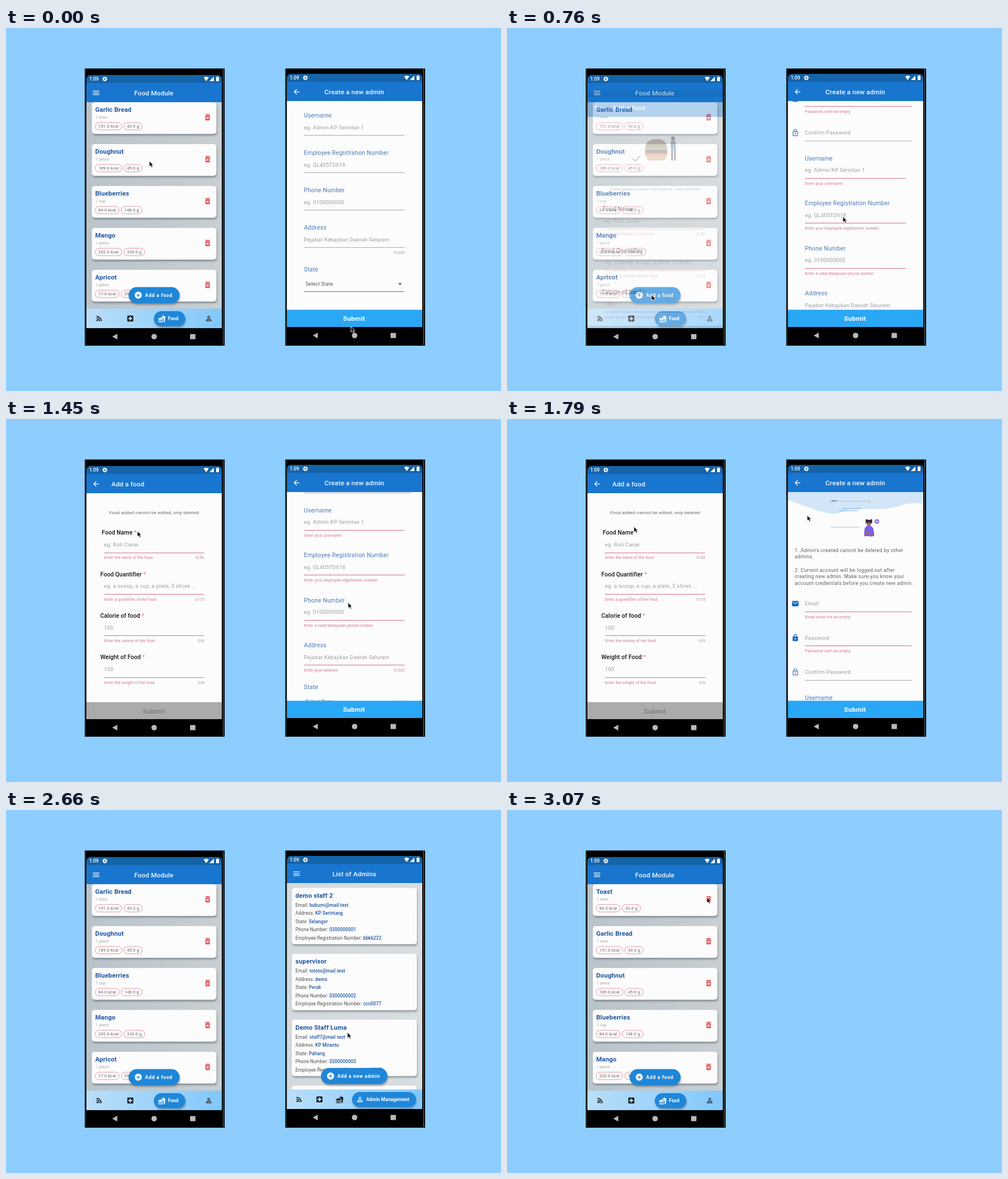
An HTML page that plays this animation: 874x641 px, repeating every 3.48 s.

```html
<!DOCTYPE html>
<html lang="en">
<head>
<meta charset="utf-8">
<title>Two phone screens</title>
<style>
html, body { margin: 0; width: 100%; height: 100%; overflow: hidden; background: #8ecdff; }
svg { display: block; width: 874px; height: 641px; }
text { font-family: Roboto, Arial, sans-serif; white-space: pre; }
.raised { filter: drop-shadow(1px 3px 1.5px rgba(60, 75, 85, .42)); }
</style>
</head>
<body>
<svg id="stage" viewBox="0 0 874 641" xmlns="http://www.w3.org/2000/svg"></svg>
<script>
const LOOP = 3480, STEP = 3070 / 53;
const BLUE = '#1976cf', INK = '#1f559f', FIELD = '#4c78b5', RED = '#d3728a', COUNT = '#b38a95', HINT = '#9c9c9c', PAPER = '#fcfcfc';

const ICONS = {
  menu: 'M3 18h18v-2H3zm0-5h18v-2H3zm0-7v2h18V6z',
  back: 'M20 11H7.83l5.59-5.59L12 4l-8 8 8 8 1.41-1.41L7.83 13H20z',
  feed: 'M6.18 15.64a2.18 2.18 0 1 0 0 4.36 2.18 2.18 0 0 0 0-4.36zM4 4.44v2.83c7.03 0 12.73 5.7 12.73 12.73h2.83C19.56 11.41 12.59 4.44 4 4.44zm0 5.66v2.83c3.9 0 7.07 3.17 7.07 7.07h2.83c0-5.47-4.43-9.9-9.9-9.9z',
  clinic: 'M19 3H5a2 2 0 0 0-2 2v14a2 2 0 0 0 2 2h14a2 2 0 0 0 2-2V5a2 2 0 0 0-2-2zm-1 11h-4v4h-4v-4H6v-4h4V6h4v4h4z',
  person: 'M12 5.9a2.1 2.1 0 1 1 0 4.2 2.1 2.1 0 0 1 0-4.2m0 9c2.97 0 6.1 1.46 6.1 2.1v1.1H5.9V17c0-.64 3.13-2.1 6.1-2.1M12 4a4 4 0 1 0 0 8 4 4 0 0 0 0-8zm0 9c-2.67 0-8 1.34-8 4v3h16v-3c0-2.66-5.33-4-8-4z',
  food: 'M18.06 23h1.66c.84 0 1.53-.64 1.63-1.46L23 5.05h-5V1h-1.97v4.05h-4.97l.3 2.34c4 1 6.7 4 6.7 7.55zM1 22v-1h15v1l-1 1H2zm15-7c0-8-15-8-15 0zM1 17h15v2H1z',
  add: 'M12 2a10 10 0 1 0 0 20 10 10 0 0 0 0-20zm5 11h-4v4h-2v-4H7v-2h4V7h2v4h4z',
  bin: 'M6 19a2 2 0 0 0 2 2h8a2 2 0 0 0 2-2V7H6zm2.46-7.12l1.41-1.41L12 12.59l2.12-2.12 1.41 1.41L13.41 14l2.12 2.12-1.41 1.41L12 15.41l-2.12 2.12-1.41-1.41L10.59 14zM15.5 4l-1-1h-5l-1 1H5v2h14V4z',
  mail: 'M20 4H4a2 2 0 0 0-2 2v12a2 2 0 0 0 2 2h16a2 2 0 0 0 2-2V6a2 2 0 0 0-2-2zm0 4l-8 5-8-5V6l8 5 8-5z',
  lock: 'M18 8h-1V6A5 5 0 0 0 7 6v2H6a2 2 0 0 0-2 2v10a2 2 0 0 0 2 2h12a2 2 0 0 0 2-2V10a2 2 0 0 0-2-2zM9 8V6a3 3 0 0 1 6 0v2zm3 5a2 2 0 1 1 0 4 2 2 0 0 1 0-4z',
  lockOutline: 'M18 8h-1V6A5 5 0 0 0 7 6v2H6a2 2 0 0 0-2 2v10a2 2 0 0 0 2 2h12a2 2 0 0 0 2-2V10a2 2 0 0 0-2-2zM9 8V6a3 3 0 0 1 6 0v2zm9 12H6V10h12zm-6-7a2 2 0 1 1 0 4 2 2 0 0 1 0-4z'
};

// Drawing helpers; text and icons are placed by their vertical centre.
const rect = (x, y, w, h, fill, r = 0, more = '') =>
  `<rect x="${x}" y="${y}" width="${w}" height="${h}" rx="${r}" fill="${fill}" ${more}/>`;
const text = (x, y, s, size, fill, { w = 400, ls = 0, a = 'start' } = {}) =>
  `<text x="${x}" y="${y + size * .355}" font-size="${size}" font-weight="${w}" letter-spacing="${ls}" text-anchor="${a}" fill="${fill}">${s}</text>`;
const shape = (d, fill, more = '') => `<path d="${d}" fill="${fill}" ${more}/>`;
const icon = (name, x, y, fill, size = 14) =>
  shape(ICONS[name], fill, `fill-rule="evenodd" transform="translate(${x - size / 2} ${y - size / 2}) scale(${size / 24})"`);
const rule = (x1, x2, y, color) => `<path d="M${x1} ${Math.floor(y) + .5}H${x2}" stroke="${color}"/>`;
const group = (id, body, more = '') => `<g id="${id}" ${more}>${body}</g>`;
const title = (x, y, s, a = 'middle') => text(x, y, s, 11.7, '#f2f8ff', { w: 500, ls: .1, a });
const heading = (x, y, s) => text(x, y, s, 11.3, INK, { w: 700, ls: .15 });
const label = (x, y, s) => text(x, y, s, 10.46, FIELD, { ls: .21 });
const hint = (x, y, s) => text(x, y, s, 9.3, HINT, { ls: .28 });
const small = (x, y, s, fill = RED, a = 'start') => text(x, y, s, 7, fill, { ls: .12, a });

const pill = (x, y, w, h, name, s, size, ls) => `<g class="raised">${rect(x, y, w, h, '#1f86d8', h / 2)}</g>`
  + icon(name, x + (h > 28 ? 17 : 14), y + h / 2, '#fff', h > 28 ? 15 : 14)
  + text(x + (h > 28 ? 29 : 25), y + h / 2, s, size, '#fff', { w: 700, ls });

// A page header in left-phone coordinates.
const header = (name, s, x = 261, a = 'middle') =>
  rect(142, 83, 239, 14, '#1563a8') + rect(142, 97, 239, 34, BLUE) + icon(name, 159, 114.5, '#fff', 15) + title(x, 114.5, s, a);
const onRight = body => `<g transform="translate(354 -2)">${body}</g>`;

const phone = (content, dx, dy) => {
  const gear = `<circle cx="174.500" cy="90" r="2.400" fill="none" stroke="#fff" stroke-width="1.800"/><circle cx="174.500" cy="90" r="3.800" fill="none" stroke="#fff" stroke-width="1.200" stroke-dasharray="1.500 1.480"/>`;
  return rect(139 + dx, 71.5, 247, 489.5, '#000')
    + `<path d="M${383.5 + dx} 72V560" stroke="#6d7780"/><path d="M${140.5 + dx} 72V560" stroke="#454d54"/>`
    + `<g clip-path="url(#screen${dx ? 'Right' : 'Left'})">${content}`
    + `<g transform="translate(${dx} ${dy})">${rect(142, 83, 239, 14, '#1563a8')}`
    + text(147, 90.5, '1:09', 8.4, '#fff', { w: 500 }) + gear
    + shape('M349 87.500Q353.500 84.500 358 87.500L353.500 94zM367 86V94H359z', '#fff') + rect(371, 86.5, 5, 7.5, '#fff', .8) + rect(372.5, 85.5, 2, 2, '#fff')
    + '</g></g>'
    + `<g transform="translate(${dx} ${dy})">` + shape('M196.500 540V550L187.500 545z', '#b9b9b9')
    + '<circle cx="261.500" cy="545" r="4.800" fill="#b9b9b9"/>' + rect(325, 540.5, 9.5, 9, '#b9b9b9', .8) + '</g>';
};

// Left phone
const FOODS = [
  ['Toast', '1 slice', '86.0 kcal', '33.0 g'],
  ['Garlic Bread', '1 slice', '151.0 kcal', '43.0 g'],
  ['Doughnut', '1 piece', '189.0 kcal', '45.0 g'],
  ['Blueberries', '1 cup', '84.0 kcal', '148.0 g'],
  ['Mango', '1 piece', '202.0 kcal', '336.0 g'],
  ['Apricot', '1 piece', '17.0 kcal', '35.0 g']
];
const chip = (x, y, w, s) => rect(x, y - 6.5, w, 13, 'none', 6.5, 'stroke="#e0889b" stroke-width=".9"')
  + text(x + w / 2, y, s, 7.5, '#666', { ls: .15, a: 'middle' });
const foodCard = ([name, unit, energy, weight], i) => {
  const y = 131 + i * 74, w = energy.length * 4.7;
  return `<g class="raised">${rect(151.5, y, 220, 56, PAPER, 5)}</g>` + heading(157.5, y + 12.5, name)
    + small(158, y + 27, unit, '#a2a2a2') + chip(157.5, y + 42.5, w, energy)
    + chip(161 + w, y + 42.5, weight.length * 4.5 + 5.5, weight) + icon('bin', 356, y + 26.5, '#e04f50', 15);
};
const foodPage = rect(142, 131, 239, 399, 'url(#wall)')
  + `<g clip-path="url(#foodArea)">${group('foods', FOODS.map(foodCard).join(''))}</g>`
  + pill(216.5, 457.5, 90, 28.5, 'add', 'Add a food', 8.5, .7)
  + rect(142, 495.5, 239, 34.5, 'url(#bar)')
  + icon('feed', 164.5, 513, '#111') + icon('clinic', 219.5, 513, '#111') + icon('person', 358, 513, '#222')
  + pill(261, 500, 55.5, 26.5, 'food', 'Food', 8.2, 0) + header('menu', 'Food Module');

const FOOD_FIELDS = [
  ['Food Name', 'eg. Roti Canai', 'Enter the name of the food', '0/50'],
  ['Food Quantifier', 'eg. a scoop, a cup, a plate, 3 slices ...', 'Enter a quantifier of the food', '0/15'],
  ['Calorie of food', '100', 'Enter the calorie of the food', '0/6'],
  ['Weight of Food', '100', 'Enter the weight of the food', '0/6']
];
const foodField = ([name, eg, error, count], i) => {
  const y = 293.5 + i * 73.4;
  return text(i ? 166.5 : 169, y, `${name} <tspan fill="#e5737f" font-weight="400">*</tspan>`, 10.46, '#161616', { w: 500, ls: .05 })
    + hint(173, y + 21, eg) + rule(173, 350, y + 35.5, RED) + small(173, y + 44.5, error) + small(350, y + 44.5, count, COUNT, 'end');
};
const burger = shape('M244 211Q246 196 264 196T282 211z', '#80604a') + rect(243, 211, 41, 4, '#6f9a56', 2)
  + rect(244, 215, 39, 6, '#4a3530', 2) + rect(243, 221, 41, 3, '#d9564c') + shape('M245 224H282Q282 234 273 234H254Q245 234 245 224z', '#c79a5a')
  + '<circle cx="293" cy="195" r="3.500" fill="#33272e"/>' + rect(289, 199, 9, 15, '#36598c', 3) + rect(290, 213, 3, 21, '#232b42') + rect(295, 213, 3, 21, '#232b42')
  + '<path d="M222 231l5 4 8-9" fill="none" stroke="#555" stroke-width="1.500"/>';
const foodForm = rect(142, 131, 239, 399, PAPER)
  + `<g clip-path="url(#foodFormArea)">${group('foodScroll', `<g transform="translate(0 -26)">${burger}</g>`
    + text(261.5, 258, 'Food added cannot be edited, only deleted', 8.1, '#666', { ls: .17, a: 'middle' })
    + FOOD_FIELDS.map(foodField).join(''))}</g>`
  + rect(142, 500, 239, 30, '#ababab') + text(261.5, 515.5, 'Submit', 11.7, '#6c6c6c', { ls: .4, a: 'middle' })
  + header('back', 'Add a food', 186, 'start');

// Right phone
const ADMINS = [
  ['demo staff 2', 'bubumi@mail.test', 'KP Serintang', 'Selangor', '0300000001', 'bbkk222'],
  ['supervisor', 'tototo@mail.test', 'demo', 'Perak', '0300000002', 'ccc0077'],
  ['Demo Staff Luma', 'staff7@mail.test', 'KP Mirantu', 'Pahang', '0300000003', 'ddd0055'],
  ['']
];
const KEYS = ['Email', 'Address', 'State', 'Phone Number', 'Employee Registration Number'];
const adminCard = ([name, ...values], i) => {
  const y = 137.5 + i * 116.4;
  return `<g class="raised">${rect(504.5, y, 221, 99.5, PAPER, 5)}</g>` + heading(511, y + 13.5, name)
    + values.map((v, n) => text(511, y + 30.5 + n * 14.5,
      `${KEYS[n]}: <tspan fill="${INK}" font-weight="500">${v}</tspan>`, 8.14, '#4d4d4d', { ls: .13 })).join('');
};
const adminPage = rect(496, 129, 239, 399, 'url(#paleWall)') + ADMINS.map(adminCard).join('')
  + pill(556, 455.5, 117.5, 28.5, 'add', 'Add a new admin', 8.5, .65)
  + rect(496, 493.5, 239, 34.5, 'url(#bar)')
  + icon('feed', 517.5, 511, '#111') + icon('clinic', 553.5, 511, '#111') + icon('food', 589, 511, '#111')
  + pill(611, 498, 113, 26.5, 'person', 'Admin Management', 8.2, .1) + onRight(header('menu', 'List of Admins'));

const NOTES = ["1. Admin's created cannot be deleted by other", 'admins.', '', '2. Current account will be logged out after',
  'creating new admin. Make sure you know your', 'account credentials before you create new admin.'];
const ADMIN_FIELDS = [
  ['Username', 'eg. Admin KP Serintan 1', 'Enter your username'],
  ['Employee Registration Number', 'eg. QL405TD618', 'Enter your employee registration number'],
  ['Phone Number', 'eg. 0100000000', 'Enter a valid Malaysian phone number'],
  ['Address', 'Pejabat Kebajikan Daerah Seluram', 'Enter your address']
];
const LOGIN = [['mail', 'Email', 'Email must not be empty'], ['lock', 'Password', "Password can't be empty"], ['lockOutline', 'Confirm Password', '']];

const chatPicture = shape('M496 129H735V150Q715 146 695 153T640 159 590 165 535 157 496 143z', '#d3e6f8')
  + '<path d="M571 145H640V150M571 145V149M571 191H623" fill="none" stroke="#aab8c6" stroke-width=".9"/>'
  + '<path d="M592 158H626M586 162H620" stroke="#7fb2e6"/>' + rect(573, 143.5, 9, 2, '#6b8fb5')
  + shape('M631 207Q629 188 639 188T648 207z', '#7561ee') + '<circle cx="639" cy="184" r="4.500" fill="#a4685a"/>'
  + shape('M633 184Q633 178 639 178T645 184Q639 181 633 184z', '#2b2335') + '<circle cx="635" cy="179" r="2" fill="#2b2335"/><circle cx="643" cy="179" r="2" fill="#2b2335"/>'
  + '<path d="M632 205Q638 196 640 203T648 203" fill="none" stroke="#a4685a" stroke-width="2.500"/>'
  + '<circle cx="653" cy="181" r="4" fill="#8272ef"/><path d="M651 181h4m-2-2v4" stroke="#fff" stroke-width=".9"/>';

const adminFields = failed => {
  const gap = failed ? 13.4 : 0, line = failed ? RED : '#aaa';
  let y = failed ? 492 : 465.2;
  const login = LOGIN.map(([name, s, error], i) => {
    const at = 326 + i * (47 + gap);
    return icon(name, 509, at, name === 'lockOutline' ? '#4a74bb' : '#1a6bc0') + hint(526, at, s)
      + rule(526, 715, at + 14.5, error ? line : '#aaa') + (failed ? small(526, at + 23.5, error) : '');
  });
  const fields = ADMIN_FIELDS.map(([name, eg, error], i) => {
    const at = y;
    y += i < 3 ? 66 + gap : 73.7;
    return label(526, at, name) + hint(526, at + 21, eg) + rule(526, 704, at + 35.3, line)
      + (failed ? small(526, at + 44.5, error) : '') + (i === 3 ? small(704, at + 44.5, '0/200', failed ? COUNT : '#999', 'end') : '');
  });
  return login.join('') + fields.join('') + label(526, y, 'State')
    + text(529, y + 26, 'Select State', 8.8, '#555', { ls: .15 }) + shape(`M692.500 ${y + 24.5}h6.500l-3.250 3.500z`, '#555')
    + rule(526, 703, y + 40, '#4a75a8');
};
const adminForm = rect(496, 129, 239, 399, PAPER)
  + `<g clip-path="url(#adminFormArea)">${group('adminScroll', chatPicture
    + NOTES.map((s, i) => text(508, 231.5 + i * 11.7, s, 8.7, '#5f5f5f', { ls: .36 })).join('')
    + group('calm', adminFields(false)) + group('failed', adminFields(true)))}</g>`
  + rect(496, 497.5, 239, 30.5, '#2aa7f5') + text(614.5, 513, 'Submit', 11.8, '#fff', { w: 700, ls: .2, a: 'middle' })
  + onRight(header('back', 'Create a new admin'));

// Stage
const clip = (id, x, y, w, h, r = 0) => `<clipPath id="${id}">${rect(x, y, w, h, '#000', r)}</clipPath>`;
const fade = (id, from, to) => `<linearGradient id="${id}"><stop stop-color="${from}"/><stop offset="1" stop-color="${to}"/></linearGradient>`;
const rounded = (id, x, y) => `<clipPath id="${id}"><path d="M${x} ${y + 447}V${y + 9}q0-9 9-9h221q9 0 9 9V${y + 447}z"/></clipPath>`;
const cursor = id => group(id, shape('M0 0V10L2.400 8 4.200 11.500 6 10.600 4.300 7.300H7.300z', '#111', 'stroke="#fff" stroke-width=".8"'));

document.getElementById('stage').innerHTML = '<defs>'
  + rounded('screenLeft', 142, 83) + rounded('screenRight', 496, 81)
  + clip('foodArea', 142, 131, 239, 364.5) + clip('foodFormArea', 142, 131, 239, 369) + clip('adminFormArea', 496, 129, 239, 368.5)
  + fade('wall', '#b9c4ca', '#c9ced1') + fade('paleWall', '#d3d9dc', '#d9dddf') + fade('bar', '#b9def9', '#82c8fc') + '</defs>'
  + rect(0, 0, 874, 641, '#8ecdff')
  + phone(foodPage + group('foodForm', foodForm), 0, 0) + cursor('leftCursor')
  + group('rightPhone', phone(adminPage + group('adminForm', adminForm), 354, -2) + cursor('rightCursor'));

// Motion: [time, value...] keys with eased steps between them.
const LEFT_POINTER = [[0, 253, 235], [180, 253, 235], [580, 255, 471], [880, 255, 471], [1300, 232, 198], [1450, 232, 198], [1790, 224, 190], [1950, 224, 190], [2260, 153, 121]];
const RIGHT_POINTER = [[0, 609, 527], [230, 609, 527], [580, 593, 333], [760, 593, 333], [1160, 604, 324], [1450, 604, 324], [1790, 530, 170], [1910, 530, 170], [2200, 510, 104], [2370, 510, 104], [2780, 627, 468]];
const FOOD_OPEN = [[640, 0], [760, .32], [880, 1], [2340, 1], [2550, 0]];
const ADMIN_OPEN = [[2200, 1], [2310, .32], [2430, 0]];
const FOOD_SCROLL = [[980, 0], [1270, 93]];
const ADMIN_SCROLL = [[400, 311], [760, 262], [1160, 331], [1450, 331], [1740, 0]];

const at = (keys, t) => {
  const next = keys.findIndex(k => k[0] > t);
  if (next === 0) return keys[0].slice(1);
  if (next < 0) return keys[keys.length - 1].slice(1);
  const a = keys[next - 1], b = keys[next], p = (t - a[0]) / (b[0] - a[0]), e = p * p * (3 - 2 * p);
  return a.slice(1).map((v, i) => v + (b[i + 1] - v) * e);
};
const $ = id => document.getElementById(id);
const move = (id, x, y) => $(id).setAttribute('transform', `translate(${x} ${y})`);
const show = (id, on) => $(id).setAttribute('visibility', on ? 'inherit' : 'hidden');
const page = (id, open) => {
  $(id).setAttribute('opacity', open);
  show(id, open > 0);
  move(id, 0, Math.round(38 * (1 - open)));
};

function draw(now) {
  const step = Math.min(53, Math.floor(now % LOOP / STEP + .15)), t = Math.round(step * STEP / 10) * 10;
  const ended = step === 53;
  page('foodForm', at(FOOD_OPEN, t)[0]);
  page('adminForm', at(ADMIN_OPEN, t)[0]);
  move('foodScroll', 0, -Math.round(at(FOOD_SCROLL, t)[0]));
  move('adminScroll', 0, -Math.round(at(ADMIN_SCROLL, t)[0]));
  move('foods', 0, ended ? 0 : -74);
  show('calm', step < 3);
  show('failed', step >= 3);
  move('leftCursor', ...(ended ? [353, 154] : at(LEFT_POINTER, t)));
  show('leftCursor', ended || t < 2600);
  move('rightCursor', ...at(RIGHT_POINTER, t));
  $('rightPhone').setAttribute('display', ended ? 'none' : 'inline');
}
function tick() {
  draw(performance.now());
  requestAnimationFrame(tick);
}
tick();
</script>
</body>
</html>
```
